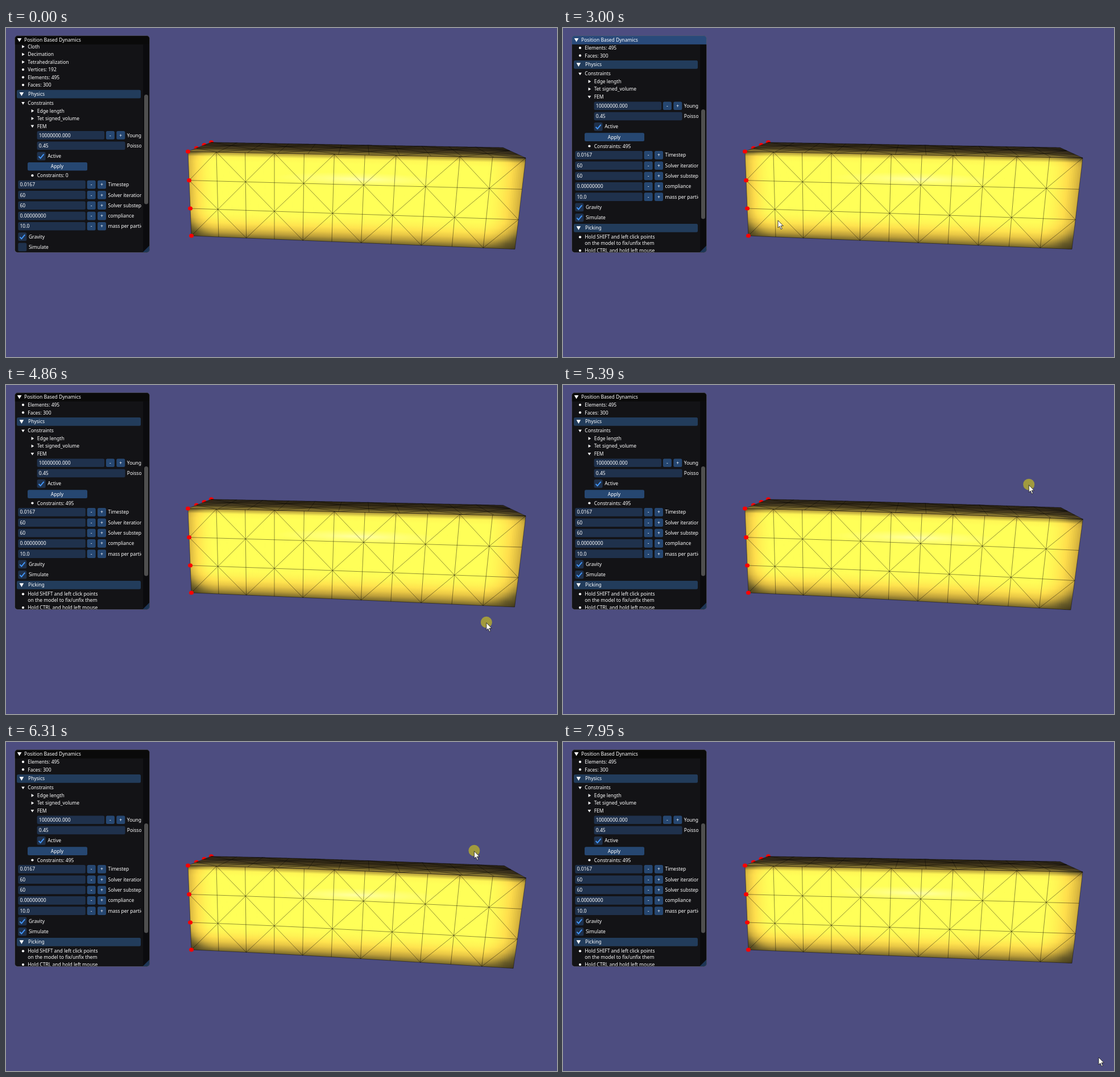
These frames come from a looping animation (969x578 px, 8000 ms). An HTML page with a canvas:

```html
<!DOCTYPE html>
<html lang="en">
<head>
<meta charset="utf-8">
<title>Position Based Dynamics</title>
<style>
  html, body { margin: 0; width: 100%; height: 100%; overflow: hidden; background: #4d4d80; }
  canvas, svg { position: absolute; left: 0; top: 0; width: 969px; height: 578px; }
  text { font: 8.5px "Noto Sans", "Open Sans", sans-serif; fill: #fff; }
  .frame { fill: #1f314c; }
  .button { fill: #264771; }
  .header { fill: #223c5b; }
  .arrow { fill: #fff; }
  .tick { fill: none; stroke: #4296fa; stroke-width: 1.9; }
  .hover { fill: #4296fa; }
  .frame.hover { fill: #264771; }
</style>
</head>
<body>
<canvas id="view" width="969" height="578"></canvas>
<svg viewBox="0 0 969 578">
  <defs>
    <clipPath id="body"><rect x="16" y="29" width="222" height="364.5"/></clipPath>
    <clipPath id="shell"><rect x="15.5" y="13.5" width="237" height="381" rx="5"/></clipPath>
  </defs>
  <g clip-path="url(#shell)">
    <rect x="15" y="13" width="238" height="382" fill="#131316"/>
    <rect x="241" y="29" width="12" height="366" fill="#0b0b0e"/>
    <rect id="grab" x="243" y="117" width="7" height="192.5" rx="3.5" fill="#4f4f4f"/>
    <path d="M240 394.5L252.5 382V394.5Z" fill="#1d3556"/>
    <g clip-path="url(#body)"><g id="rows"></g></g>
    <rect id="title" x="15" y="13" width="238" height="15.8"/>
    <path class="arrow" d="M19.8 18H27.4L23.6 24.6Z"/>
    <text x="32" y="24.3">Position Based Dynamics</text>
  </g>
  <rect x="15.5" y="13.5" width="237" height="381" rx="5" fill="none" stroke="#6e6e80" stroke-opacity=".5"/>
  <g id="cursor">
    <circle id="halo" r="10" cy="-1" fill="#beb428" fill-opacity=".75"/>
    <path d="M0 0V13L3 10.3L5.2 15.6L7.3 14.7L5.1 9.6H9.3Z" fill="#fffff0" stroke="#15151a" stroke-width=".8"/>
  </g>
</svg>
<script>
(() => {
const $ = id => document.getElementById(id);
const ctx = $('view').getContext('2d');
const LOOP = 8000;

// ---- panel ----
const text = (x, y, s, extra = '') => `<text x="${x}" y="${y + 3.2}" ${extra}>${s}</text>`;
const box = (cls, x, y, w, id = '') =>
  `<rect class="${cls}" id="${id}" x="${x}" y="${y - 7.2}" width="${w}" height="14.6" rx="2.5"/>`;
const folded = (x, y, s) =>
  `<path class="arrow" d="M${x - 1.8} ${y - 2.8}L${x + 2.8} ${y}L${x - 1.8} ${y + 2.8}Z"/>` + text(x + 8.3, y, s);
const unfolded = (x, y, s) =>
  `<path class="arrow" d="M${x - 2.8} ${y - 1.9}H${x + 2.8}L${x} ${y + 2.7}Z"/>` + text(x + 8.3, y, s);
const bullet = (x, y, s, id = '') =>
  `<circle class="arrow" cx="${x}" cy="${y}" r="2.1"/>` + text(x + 8.3, y, s, `id="${id}"`);
const header = (y, s) => box('header', 19, y, 218) +
  `<path class="arrow" d="M23.6 ${y - 3}H31.2L27.4 ${y + 3.6}Z"/>` + text(39, y, s);
const small = (x, y, s) => box('button', x, y, 15) + text(x + 7.5, y, s, 'text-anchor="middle"');
const number = (x, y, value, label) => box('frame', x, y, 118.5) + text(x + 3.2, y, value) +
  small(x + 121.3, y, '-') + small(x + 139.7, y, '+') + text(x + 158.2, y, label);
const check = (x, y, s, id = '') => box('frame', x, y, 15, id) +
  `<path class="tick" id="${id}Tick" d="M${x + 3} ${y + .6}L${x + 6} ${y + 3.8}L${x + 12} ${y - 3.4}"/>` +
  text(x + 18.6, y, s);

$('rows').innerHTML = [
  folded(30, 32.7, 'Cloth'), folded(30, 46.2, 'Decimation'), folded(30, 59.7, 'Tetrahedralization'),
  bullet(30, 73.1, 'Vertices: 192'), bullet(30, 86.6, 'Elements: 495'), bullet(30, 100.1, 'Faces: 300'),
  header(116, 'Physics'), unfolded(30, 132, 'Constraints'),
  folded(46.4, 145.6, 'Edge length'), folded(46.4, 159, 'Tet signed_volume'), unfolded(46.4, 172.5, 'FEM'),
  number(54.6, 188.3, '10000000.000', "Young's modulus"),
  box('frame', 54.6, 206.6, 155), text(57.8, 206.6, '0.45'), text(212.8, 206.6, 'Poisson ratio'),
  check(54.6, 225, 'Active', 'active'),
  box('button', 38, 243.2, 105, 'apply'), text(90, 243.2, 'Apply', 'text-anchor="middle"'),
  bullet(46.4, 259.2, 'Constraints: 0', 'count'),
  number(21.3, 275, '0.0167', 'Timestep'), number(21.3, 293.3, '60', 'Solver iterations'),
  number(21.3, 311.6, '60', 'Solver substeps'), number(21.3, 330, '0.00000000', 'compliance'),
  number(21.3, 348.2, '10.0', 'mass per particle'),
  check(21.3, 366.5, 'Gravity', 'gravity'), check(21.3, 384.8, 'Simulate', 'sim'),
  header(403, 'Picking'),
  bullet(30, 419, 'Hold SHIFT and left click points'), text(38.3, 429.3, 'on the model to fix/unfix them'),
  bullet(30, 442.8, 'Hold CTRL and hold left mouse')
].join('');

// ---- timing ----
const clamp = (v, a = 0, b = 1) => Math.min(b, Math.max(a, v));
const ease = p => (1 - Math.cos(Math.PI * clamp(p))) / 2;
const between = (t, a, b) => t >= a && t < b;

const approach = [
  [70, 877, 582], [450, 440, 310], [760, 92, 218], [900, 74, 241], [1150, 74, 241],
  [1400, 80, 238], [1850, 140, 146], [2450, 32, 333], [2820, 32, 333], [3000, 378, 338],
  [3240, 640, 165], [3560, 930, 278], [3850, 848, 362], [4120, 841, 462]
];
const drag = [[4120, 462], [4640, 174], [5000, 535], [5500, 130], [5870, 536], [6230, 179], [6900, 536], [7376, 157]];
const leave = [[7376, 814, 157], [7790, 930, 505], [7900, 942, 554]];

function sample(keys, t) {
  const i = keys.findIndex(k => k[0] > t);
  if (i < 0) return keys[keys.length - 1].slice(1);
  if (i === 0) return keys[0].slice(1);
  const a = keys[i - 1], b = keys[i], p = ease((t - a[0]) / (b[0] - a[0]));
  return a.slice(1).map((v, n) => v + (b[n + 1] - v) * p);
}
function pointer(t) {
  if (t < 4120) return sample(approach, t);
  if (t >= 7376) return sample(leave, t);
  const [y] = sample(drag, t);
  return [846 - (y - 376) ** 2 / 1500, y];
}
// The beam tip swings against the pointer, slightly delayed.
function sag(t) {
  const strength = clamp(Math.min((t - 3850) / 1500, (7800 - t) / 300));
  return -0.055 * (pointer(t - 60)[1] - 370) * strength;
}

// ---- beam ----
const COLS = 11, ROWS = 3, STRIPS = 198, STOPS = 18;

// Perspective map from the unit square to a quad given clockwise.
function project([[x0, y0], [x1, y1], [x2, y2], [x3, y3]]) {
  const ax = x1 - x2, ay = y1 - y2, bx = x3 - x2, by = y3 - y2;
  const sx = x0 - x1 + x2 - x3, sy = y0 - y1 + y2 - y3, det = ax * by - ay * bx;
  const g = (sx * by - sy * bx) / det, h = (ax * sy - ay * sx) / det;
  return (u, v) => {
    const w = 1 + g * u + h * v;
    return [
      (x0 + (x1 - x0 + g * x1) * u + (x3 - x0 + h * x3) * v) / w,
      (y0 + (y1 - y0 + g * y1) * u + (y3 - y0 + h * y3) * v) / w
    ];
  };
}
const sideMap = project([[320, 217], [914, 228.3], [895, 388.6], [326, 365]]);
const lidMap = project([[361, 200.8], [874, 210], [914, 228.3], [320, 217]]);
const bend = u => u * u * (3 - u) / 2;
const bentSide = d => (u, v) => {
  const [x, y] = sideMap(u, v), b = d * bend(u);
  return [x + b * (0.04 - 0.32 * v), y + b * (1 - 0.13 * v)];
};
const bentLid = d => (u, v) => {
  const [x, y] = lidMap(u, v), b = d * bend(u);
  return [x + b * (0.2 - 0.16 * v), y + b * (0.7 + 0.3 * v)];
};

const ramp = stops => s => {
  const i = Math.max(1, stops.findIndex(k => k[0] >= s));
  const a = stops[i - 1], b = stops[i], p = clamp((s - a[0]) / (b[0] - a[0]));
  return `rgb(${[1, 2, 3].map(n => Math.round(a[n] + (b[n] - a[n]) * p))})`;
};
const gold = ramp([[0, 45, 38, 20], [.45, 105, 92, 40], [.7, 215, 180, 62], [.85, 255, 222, 76], [1, 255, 255, 88]]);
const brown = ramp([[0, 40, 33, 18], [.45, 62, 51, 25], [.8, 104, 89, 38], [1, 170, 147, 58]]);
const sq = x => x > 0 ? x * x : 0;
const sideShade = (u, v) => gold(clamp(1 - .3 * sq(1 - u / .09) - .33 * sq((u - .89) / .11)
  - .52 * sq((v - .67) / .33) - .4 * sq(1 - v / .08)));
const lidShade = (u, v) => brown(clamp(v - .3 * sq((u - .9) / .1)));

const shades = fn => Array.from({ length: STRIPS }, (_, i) =>
  Array.from({ length: STOPS + 1 }, (_, j) => fn((i + .5) / STRIPS, j / STOPS)));
const sideShades = shades(sideShade), lidShades = shades(lidShade);

// Thin strips, each shaded at right angles to the long edge.
function fillFace(at, table) {
  table.forEach((colors, i) => {
    const u = i / STRIPS, next = Math.min(1, (i + 1.3) / STRIPS);
    const a = at(u, 0), b = at(u, 1), c = at(next, 0);
    const len = Math.hypot(c[0] - a[0], c[1] - a[1]);
    const nx = (a[1] - c[1]) / len, ny = (c[0] - a[0]) / len;
    const depth = (b[0] - a[0]) * nx + (b[1] - a[1]) * ny;
    const grad = ctx.createLinearGradient(a[0], a[1], a[0] + nx * depth, a[1] + ny * depth);
    colors.forEach((color, j) => grad.addColorStop(j / STOPS, color));
    ctx.fillStyle = grad;
    ctx.beginPath();
    for (const p of [a, c, at(next, 1), b]) ctx.lineTo(...p);
    ctx.fill();
  });
}
function wire(at, parity, alpha) {
  const p = (i, j) => at(i / COLS, j / ROWS);
  const line = (a, b) => { ctx.moveTo(...a); ctx.lineTo(...b); };
  ctx.beginPath();
  for (let i = 0; i <= COLS; i++) {
    for (let j = 0; j <= ROWS; j++) {
      if (i < COLS) line(p(i, j), p(i + 1, j));
      if (j < ROWS) line(p(i, j), p(i, j + 1));
      if (i < COLS && j < ROWS) {
        if ((i + j) % 2 === parity) line(p(i, j), p(i + 1, j + 1));
        else line(p(i + 1, j), p(i, j + 1));
      }
    }
  }
  ctx.strokeStyle = `rgba(0,0,0,${alpha})`;
  ctx.lineWidth = .75;
  ctx.stroke();
}
function dots(at, rows) {
  ctx.fillStyle = '#f00';
  for (const j of rows) {
    const [x, y] = at(0, j / ROWS);
    ctx.beginPath();
    ctx.ellipse(x, y, 4, 3.6, 0, 0, 7);
    ctx.fill();
  }
}
function shine(at) {
  const [x, y] = at(.53, .27);
  const grad = ctx.createRadialGradient(0, 0, 0, 0, 0, 1);
  grad.addColorStop(0, 'rgba(255,255,215,.6)');
  grad.addColorStop(.4, 'rgba(255,255,205,.3)');
  grad.addColorStop(1, 'rgba(255,255,190,0)');
  ctx.save();
  ctx.translate(x, y);
  ctx.rotate(.025);
  ctx.scale(150, 12);
  ctx.fillStyle = grad;
  ctx.fillRect(-1, -1, 2, 2);
  ctx.restore();
}
function drawBeam(d) {
  const side = bentSide(d), lid = bentLid(d);
  ctx.clearRect(0, 0, 969, 578);
  dots(lid, [0, 1, 2]);
  fillFace(lid, lidShades);
  fillFace(side, sideShades);
  shine(side);
  wire(lid, 0, .5);
  wire(side, 1, .58);
  dots(side, [0, 1, 2, 3]);
}

// ---- loop ----
function tick() {
  const t = performance.now() % LOOP;
  const scroll = ease((t - 1350) / 450);
  $('rows').setAttribute('transform', `translate(0 ${-51.7 * scroll})`);
  $('grab').setAttribute('y', 117 + 26 * scroll);
  $('title').setAttribute('fill', between(t, 1060, 3860) ? '#294a7a' : '#0a0a0a');
  $('count').textContent = 'Constraints: ' + (t < 1100 ? 0 : 495);
  $('apply').classList.toggle('hover', between(t, 1060, 1420));
  $('sim').classList.toggle('hover', between(t, 2400, 2850));
  $('simTick').style.visibility = t < 2750 ? 'hidden' : 'visible';

  const [x, y] = pointer(t);
  $('cursor').setAttribute('transform', `translate(${x} ${y})`);
  const pressed = between(t, 1050, 1160) || between(t, 2700, 2800) || between(t, 3850, 7600);
  $('halo').style.visibility = pressed ? 'visible' : 'hidden';
  drawBeam(sag(t));
  requestAnimationFrame(tick);
}
tick();
})();
</script>
</body>
</html>
```
